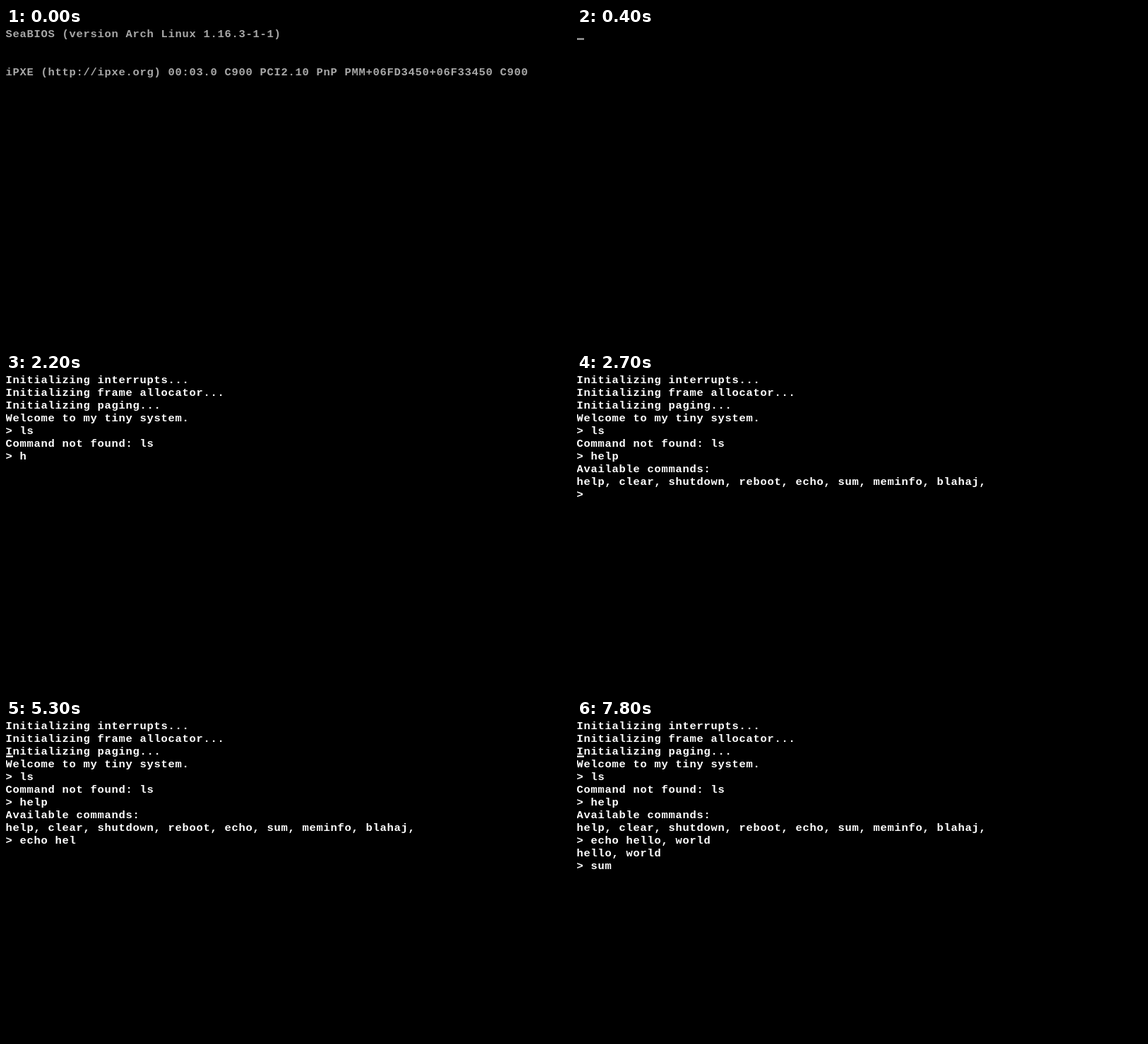
These frames come from a looping animation (800x450 px, 8 s). An HTML page with a canvas:

```html
<!DOCTYPE html>
<html lang="en">
<head>
<meta charset="utf-8">
<title>Tiny system boot</title>
<style>
html, body { margin: 0; width: 100%; height: 100%; overflow: hidden; background: #000; }
canvas { display: block; width: 800px; height: 450px; }
</style>
</head>
<body>
<canvas id="screen" width="800" height="450"></canvas>
<script>
const ctx = document.getElementById("screen").getContext("2d");
const LOOP = 8000, TICK = 100;
const CELL_W = 10, CELL_H = 18, BASELINE = 13.4;
const GRAY = "#a8a8a8", WHITE = "#fff";

// Hardware cursor: toggles every BLINK ms, switched on at BLINK_START.
const BLINK = 269, BLINK_START = 746;

const firmware = `SeaBIOS (version Arch Linux 1.16.3-1-1)


iPXE (http://ipxe.org) 00:03.0 C900 PCI2.10 PnP PMM+06FD3450+06F33450 C900



`;
const disk = "Booting from Hard Disk...\n";
const stages = "Booting (first stage)...\nBooting (second stage)...\n";

const welcome = `Initializing interrupts...
Initializing frame allocator...
Initializing paging...
Welcome to my tiny system.
> `;

// Everything the shell prints after the welcome: [time, text]
const session = [
  [1700, "l"], [1800, "s"],
  [2100, "\nCommand not found: ls\n> "],
  [2200, "h"], [2400, "e"], [2600, "lp"],
  [2700, "\nAvailable commands:\nhelp, clear, shutdown, reboot, echo, sum, meminfo, blahaj,\n> "],
  [4300, "e"], [4500, "ch"], [4600, "o"], [4800, " "],
  [5100, "h"], [5200, "e"], [5300, "l"], [5400, "l"],
  [5700, "o"], [5800, ","], [5900, " "],
  [6100, "w"], [6200, "o"], [6300, "r"], [6400, "l"], [6500, "d"],
  [6800, "\nhello, world\n> "],
  [7600, "s"], [7700, "u"], [7800, "m"]
];

function print(text, color) {
  ctx.fillStyle = color;
  text.split("\n").forEach((line, row) => {
    [...line].forEach((ch, col) => {
      if (ch !== " ") ctx.fillText(ch, col * CELL_W - 0.6, row * CELL_H + BASELINE);
    });
  });
}

function cursor(row, color) {
  ctx.fillStyle = color;
  ctx.fillRect(0, row * CELL_H + 14.4, CELL_W, 2.3);
}

function draw(t) {
  const lit = Math.floor((t - BLINK_START) / BLINK) % 2 === 0;
  ctx.fillStyle = "#000";
  ctx.fillRect(0, 0, 800, 450);
  ctx.font = "bold 15.5px 'Liberation Mono', 'DejaVu Sans Mono', monospace";
  ctx.textBaseline = "alphabetic";

  if (t < 400) {
    print(firmware + (t >= 100 ? disk : "") + (t >= 200 ? stages : ""), GRAY);
    if (t >= 200) cursor(16, GRAY);
  } else if (t < 500) {
    cursor(0, GRAY);
  } else {
    const typed = session.filter(([at]) => at <= t).map(([, text]) => text);
    print(welcome + typed.join(""), WHITE);
    if (lit) cursor(2, WHITE);
  }
}

const start = performance.now();
function frame() {
  const t = (performance.now() - start) % LOOP;
  draw(Math.floor(t / TICK) * TICK);
  requestAnimationFrame(frame);
}
frame();
</script>
</body>
</html>
```
